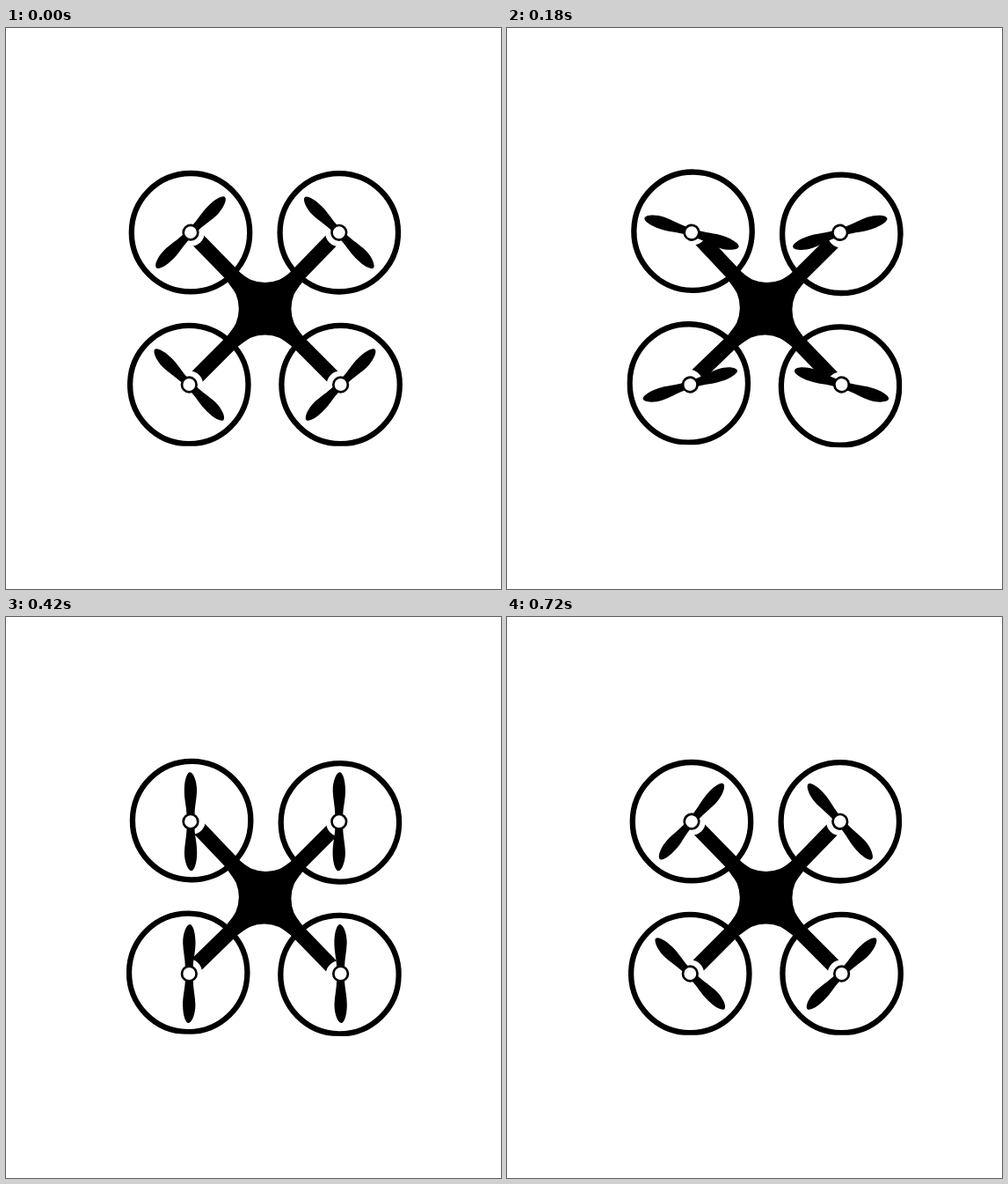
Animation, 563 px wide and 637 px high, one loop 750 ms. Source, as an HTML page:

```html
<!DOCTYPE html>
<html lang="en">
<head>
<meta charset="utf-8">
<title>Quadcopter</title>
<style>
  html, body { margin: 0; width: 100%; height: 100%; overflow: hidden; background: #fff; }
  svg { display: block; width: 563px; height: 637px; }
</style>
</head>
<body>
<svg viewBox="0 0 563 637">
  <defs>
    <clipPath id="crop"><rect x="138" y="150" width="313" height="324.8"/></clipPath>
    <path id="blade" d="M6-4.4C17-4.6 24-7.3 36-7.2C48-7 56-4 56-.8C56 3 46 7.2 35 7.1C26 6.9 17 4.5 6 4.4Z"/>
    <g id="prop">
      <use href="#blade"/>
      <use href="#blade" transform="rotate(180)"/>
      <circle r="8.3" fill="#fff" stroke="#000" stroke-width="2.7"/>
    </g>
  </defs>
  <g id="frame" clip-path="url(#crop)">
    <g id="rings" fill="none" stroke="#000" stroke-width="6.3"></g>
    <g id="arms" stroke="#000"></g>
    <g id="hull"></g>
    <g id="halos" fill="#fff"></g>
  </g>
  <g id="props"></g>
</svg>
<script>
const LOOP = 750, STEP = 30;
const CX = 294.6, CY = 318.8;
const ARM = 17, WAIST = 29.8;

// hub position, spin direction, degrees covered in the slow phase
const rotors = [
  { x: 210, y: 232.2, dir: 1, slow: 41 },
  { x: 378.8, y: 232.3, dir: -1, slow: 41 },
  { x: 208.3, y: 405, dir: -1, slow: 45 },
  { x: 380.6, y: 405, dir: 1, slow: 45 }
];

const $ = id => document.getElementById(id);

function add(parent, tag, attrs) {
  const el = document.createElementNS('http://www.w3.org/2000/svg', tag);
  for (const k in attrs) el.setAttribute(k, attrs[k]);
  return parent.appendChild(el);
}

// one concave side, its arc tangent to two diagonal arms, turned four times
const r = (WAIST - ARM * Math.SQRT1_2) / (Math.SQRT2 - 1);
const a = r * Math.SQRT1_2, b = WAIST + r - a;
for (let i = 0; i < 4; i++) {
  add($('hull'), 'path', {
    d: `M${-a} ${-b}A${r} ${r} 0 0 0 ${a} ${-b}L${b} ${-a}L0 ${WAIST - 1}L${-b} ${-a}Z`,
    transform: `translate(${CX} ${CY}) rotate(${i * 90})`
  });
}

for (const o of rotors) {
  add($('rings'), 'circle', { cx: o.x, cy: o.y, r: 67.2 });
  add($('arms'), 'line', { x1: CX, y1: CY, x2: o.x, y2: o.y, 'stroke-width': ARM });
  add($('halos'), 'circle', { cx: o.x, cy: o.y, r: 15.8 });
  o.el = add($('props'), 'use', { href: '#prop' });
}

// fast, slightly easing sweep up to vertical, then a steady slow one
function spin(t, slow) {
  const p = t / 420;
  return p < 1 ? -45 + 135 * p * (1.15 - 0.15 * p) : 90 + slow * (t - 420) / 300;
}

// the airframe rocks once, there and back
const tilt = t => 1.55 * Math.max(0, 1 - Math.abs(t / 275 - 1));

function draw(now) {
  const t = Math.floor((now % LOOP) / STEP) * STEP;
  $('frame').setAttribute('transform', `rotate(${tilt(t)} ${CX} ${CY})`);
  for (const o of rotors) {
    o.el.setAttribute('transform',
      `translate(${o.x} ${o.y}) scale(${o.dir} 1) rotate(${spin(t, o.slow)})`);
  }
}

const start = performance.now();
function tick() {
  draw(performance.now() - start);
  requestAnimationFrame(tick);
}
tick();
</script>
</body>
</html>
```
